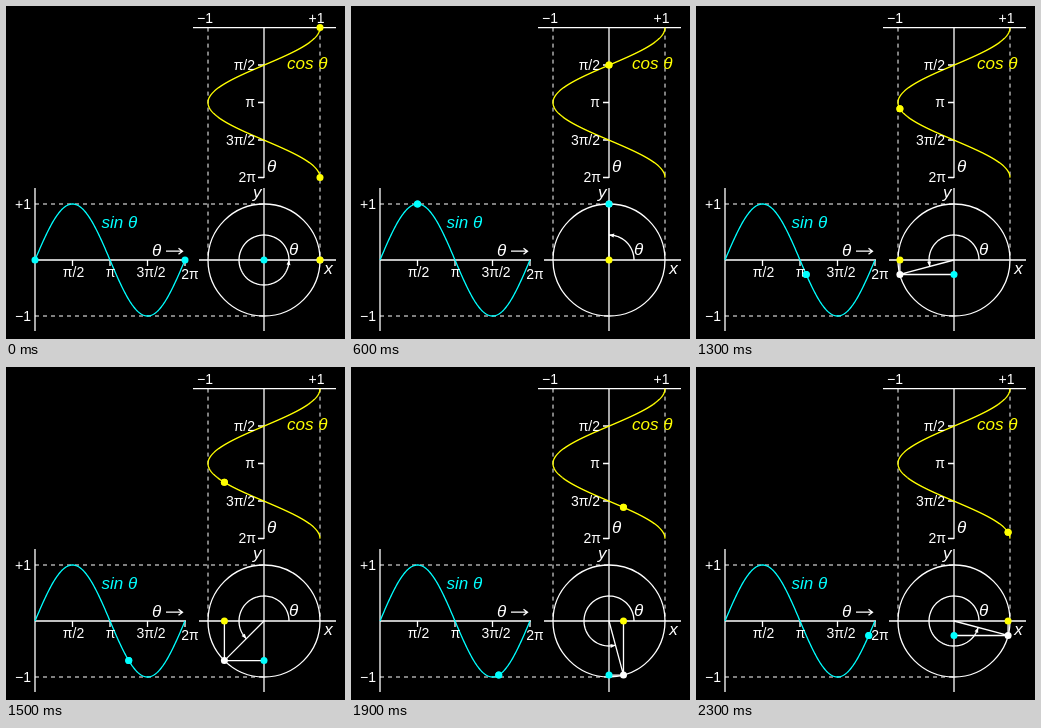
Write an HTML page that moves like this. It is 339 px wide and 333 px high and loops after 2.4 s.

```html
<!DOCTYPE html>
<html lang="en">
<head>
<meta charset="utf-8">
<title>Sine and cosine on the unit circle</title>
<style>
  html, body { margin: 0; width: 100%; height: 100%; overflow: hidden; background: #000; }
  svg { display: block; width: 339px; height: 333px; }
  text { font: 14px "Liberation Sans", Arial, sans-serif; fill: #fff; }
  .name { font-size: 17px; font-style: italic; }
  .end { text-anchor: end; }
  .mid { text-anchor: middle; }
  .line { fill: none; stroke: #fff; stroke-width: 1.3; }
  .dash { stroke-width: 1; stroke-dasharray: 4 4; }
  .sin { stroke: #0ff; }
  .cos { stroke: #ff0; }
</style>
</head>
<body>
<svg viewBox="0 0 339 333">
  <path class="line dash" d="M29 198H258 M29 310H258 M202 21.6V254 M314 21.6V254"/>
  <path class="line" d="M29 182V325 M29 254H180 M193 254H330 M258 182V325
    M187 21.6H330 M258 21V172
    M66.5 254V260 M104 254V260 M141.5 254V260 M179 254V260
    M252 59H258 M252 96.5H258 M252 134H258 M252 171.5H258"/>
  <circle class="line" cx="258" cy="254" r="56"/>
  <path id="sinCurve" class="line sin"/>
  <path id="cosCurve" class="line cos"/>

  <g class="mid">
    <text x="199" y="17">−1</text>
    <text x="310.5" y="17">+1</text>
    <text x="67.5" y="271">π/2</text>
    <text x="104.5" y="271">π</text>
    <text x="145" y="271">3π/2</text>
    <text x="184" y="273">2π</text>
  </g>
  <g class="end">
    <text x="25" y="203">+1</text>
    <text x="25" y="315">−1</text>
    <text x="249" y="64">π/2</text>
    <text x="249" y="101">π</text>
    <text x="249" y="139">3π/2</text>
    <text x="250" y="175.5">2π</text>
  </g>
  <text class="name" x="95.5" y="222" style="fill:#0ff">sin θ</text>
  <text class="name" x="281" y="63" style="fill:#ff0">cos θ</text>
  <text class="name" x="146" y="250">θ</text>
  <path class="line" d="M160 245.2H176 M172.5 242.2L176.5 245.2L172.5 248.2"/>
  <text class="name" x="261" y="166">θ</text>
  <text class="name" x="283" y="249">θ</text>
  <text class="name" x="318.3" y="268">x</text>
  <text class="name" x="247" y="192">y</text>

  <path id="arc" class="line"/>
  <path id="head" fill="#fff"/>
  <path id="rays" class="line"/>
  <g id="dots"></g>
</svg>
<script>
const CX = 258, CY = 254, R = 56, ARC = 25;
const LEFT = 29, TOP = 21.6, SPAN = 150;
const STEPS = 24, STEP_MS = 100, TAU = 2 * Math.PI;
const $ = id => document.getElementById(id);

const onCircle = (a, r) => [CX + r * Math.cos(a), CY - r * Math.sin(a)];
const onSin = a => [LEFT + SPAN * a / TAU, CY - R * Math.sin(a)];
const onCos = a => [CX + R * Math.cos(a), TOP + SPAN * a / TAU];
const trace = (fn, end, n) =>
  "M" + Array.from({ length: n + 1 }, (_, i) => fn(end * i / n).map(v => v.toFixed(2))).join("L");

$("sinCurve").setAttribute("d", trace(onSin, TAU, 150));
$("cosCurve").setAttribute("d", trace(onCos, TAU, 150));

function makeDot(color) {
  const dot = document.createElementNS("http://www.w3.org/2000/svg", "circle");
  dot.setAttribute("r", 3.5);
  dot.setAttribute("fill", color);
  $("dots").append(dot);
  return dot;
}
const place = (dot, [x, y]) => {
  dot.setAttribute("cx", x);
  dot.setAttribute("cy", y);
};

const point = makeDot("#fff");
const [cosDot, cosEnd, cosAxis] = [0, 0, 0].map(() => makeDot("#ff0"));
const [sinDot, sinEnd, sinAxis] = [0, 0, 0].map(() => makeDot("#0ff"));

function draw(step) {
  const angle = TAU * step / STEPS;
  const sweep = step ? angle : TAU;
  const [x, y] = onCircle(angle, R);

  place(point, [x, y]);
  place(sinAxis, [CX, y]);
  place(cosAxis, [x, CY]);
  place(sinDot, onSin(angle));
  place(cosDot, onCos(angle));
  // Both ends of the curves are marked when the turn closes.
  place(sinEnd, onSin(sweep));
  place(cosEnd, onCos(sweep));

  $("rays").setAttribute("d", step ? `M${CX} ${CY}L${x} ${y} M${CX} ${y}H${x}V${CY}` : "");
  $("arc").setAttribute("d", trace(a => onCircle(a, ARC), sweep, 72));
  const back = sweep - 5 / ARC;
  const tip = [onCircle(sweep, ARC), onCircle(back, ARC + 2), onCircle(back, ARC - 2)];
  $("head").setAttribute("d", "M" + tip.join("L") + "Z");
}

let shown = -1;
function tick() {
  const step = Math.floor(performance.now() / STEP_MS) % STEPS;
  if (step !== shown) draw(shown = step);
  requestAnimationFrame(tick);
}
tick();
</script>
</body>
</html>
```
